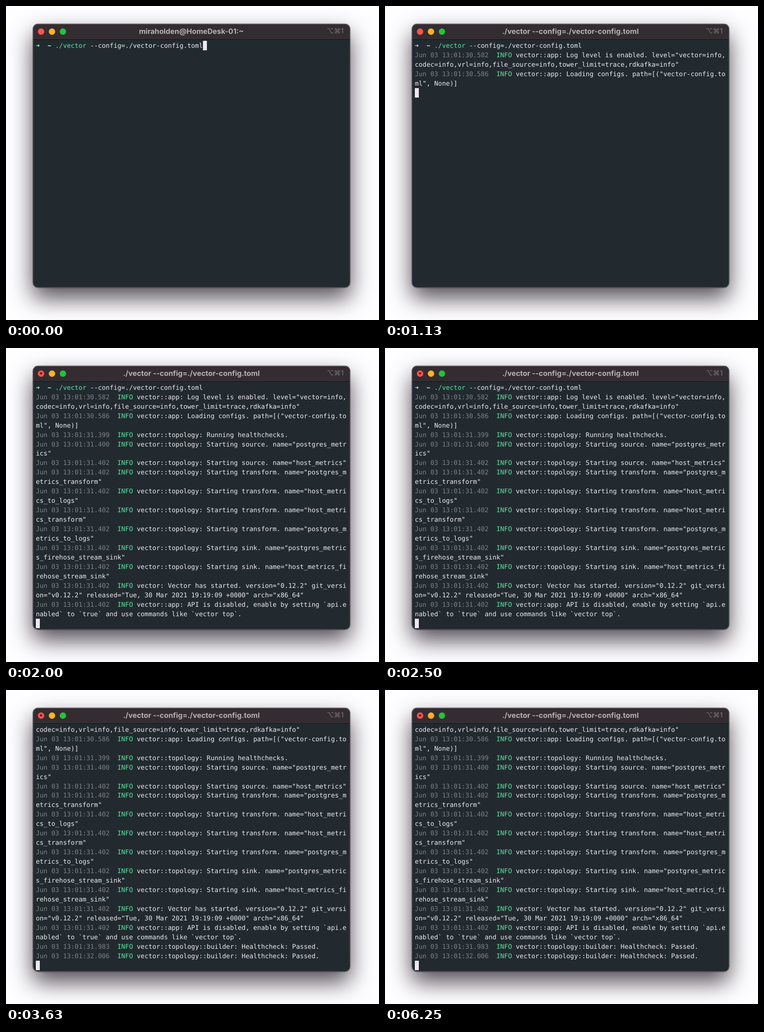
Write an HTML page that moves like this. It is 750x631 px and loops after 6.37 s.

```html
<!DOCTYPE html>
<html lang="en">
<head>
<meta charset="utf-8">
<title>Terminal</title>
<style>
html, body { margin: 0; width: 100%; height: 100%; overflow: hidden; background: #fefdff; }
body { position: relative; text-rendering: geometricPrecision; }
body * { box-sizing: border-box; }
#window, #shadow {
  position: absolute; left: 54px; top: 35.5px; width: 637.5px; height: 530.5px; border-radius: 10.5px;
}
#window { background: #222a2f; overflow: hidden; }
#shadow { box-shadow: 0 0 1px 0.5px rgba(0, 0, 0, .6), 0 21px 46px rgba(10, 0, 12, .7); }
#rim { position: absolute; inset: 0; border: 1px solid rgba(255, 255, 255, .22); border-radius: 10.5px; }
#bar {
  height: 32px; background: #332d31; border-bottom: 1px solid #121416;
  font: 700 14.65px/30px Inter, sans-serif; color: #b6b0b3; text-align: center;
}
#bar i {
  position: absolute; top: 9px; width: 13px; height: 13px; border-radius: 50%;
  box-shadow: inset 0 0 0 .6px rgba(0, 0, 0, .12);
}
#dot { position: absolute; left: 4.2px; top: 4.2px; width: 4.6px; height: 4.6px; border-radius: 50%; background: #6e0d0a; }
#keys { position: absolute; right: 12.5px; top: 0; font-weight: 500; font-size: 14px; line-height: 29px; color: #716b6f; }
#screen {
  position: absolute; left: 6px; top: 36.3px; margin: 0;
  font: 12.98px/18.96px "DejaVu Sans Mono", monospace; color: #eceaed;
}
.stamp { color: #7c8286; }
.green { color: #5fe3a1; }
.mint { color: #a6f5d0; font-weight: 700; }
.cyan { color: #b4f3ee; font-weight: 700; }
.cursor {
  display: inline-block; position: relative; top: -1.5px; width: 8px; height: 18.96px;
  vertical-align: top; background: #efe7f1;
}
</style>
</head>
<body>
<div id="shadow"></div>
<div id="window">
  <div id="bar">
    <i style="left:9.8px;background:#fb544c"><b id="dot"></b></i>
    <i style="left:32px;background:#fdb225"></i>
    <i style="left:54.3px;background:#27c13b"></i>
    <span id="title"></span>
    <span id="keys">⌥⌘1</span>
  </div>
  <pre id="screen"></pre>
  <div id="rim"></div>
</div>
<script>
const LOOP = 6370, COLS = 80, ROWS = 26;
const START = 1130, DOT = 1630, TOPOLOGY = 2000, HEALTH = 2630;
const command = './vector --config=./vector-config.toml';
const starting = (kind, name) => `31.402  INFO vector::topology: Starting ${kind}. name="${name}"`;
const passed = sec => sec + '  INFO vector::topology::builder: Healthcheck: Passed.';

const log = [
  [START, [
    '30.582  INFO vector::app: Log level is enabled. level="vector=info,codec=info,vrl=info,file_source=info,tower_limit=trace,rdkafka=info"',
    '30.586  INFO vector::app: Loading configs. path=[("vector-config.toml", None)]',
  ]],
  [TOPOLOGY, [
    '31.399  INFO vector::topology: Running healthchecks.',
    '31.400  INFO vector::topology: Starting source. name="postgres_metrics"',
    starting('source', 'host_metrics'),
    starting('transform', 'postgres_metrics_transform'),
    starting('transform', 'host_metrics_to_logs'),
    starting('transform', 'host_metrics_transform'),
    starting('transform', 'postgres_metrics_to_logs'),
    starting('sink', 'postgres_metrics_firehose_stream_sink'),
    starting('sink', 'host_metrics_firehose_stream_sink'),
    '31.402  INFO vector: Vector has started. version="0.12.2" git_version="v0.12.2" released="Tue, 30 Mar 2021 19:19:09 +0000" arch="x86_64"',
    '31.402  INFO vector::app: API is disabled, enable by setting `api.enabled` to `true` and use commands like `vector top`.',
  ]],
  [HEALTH, [passed('31.983'), passed('32.006')]],
];

const $ = id => document.getElementById(id);
const span = (cls, text) => `<span class="${cls}">${text}</span>`;
const wrap = text => text.match(new RegExp(`.{1,${COLS}}`, 'g'));
const paint = row => row.replace(/^(Jun.{16})  INFO/,
  (_, stamp) => span('stamp', stamp) + '  ' + span('green', 'INFO'));
const prompt = span('mint', '➜') + '  ' + span('cyan', '~') + ' ' +
  command.replace('./vector', span('green', './vector'));

function render(t) {
  const running = t >= START;
  const rows = log.filter(([at]) => t >= at)
    .flatMap(([, entries]) => entries.flatMap(e => wrap('Jun 03 13:01:' + e)))
    .map(paint);
  const text = [prompt, ...rows].slice(1 - ROWS).join('\n');
  $('screen').innerHTML = text + (running ? '\n' : '') + span('cursor', '');
  $('title').textContent = running ? command : 'miraholden@HomeDesk-01:~';
  $('dot').style.display = t < DOT ? 'none' : 'block';
}

const origin = performance.now();
let shown = -1;
function tick() {
  const t = (performance.now() - origin) % LOOP;
  const stage = [START, DOT, TOPOLOGY, HEALTH].filter(at => t >= at).length;
  if (stage !== shown) render(t);
  shown = stage;
  requestAnimationFrame(tick);
}
tick();
</script>
</body>
</html>
```
